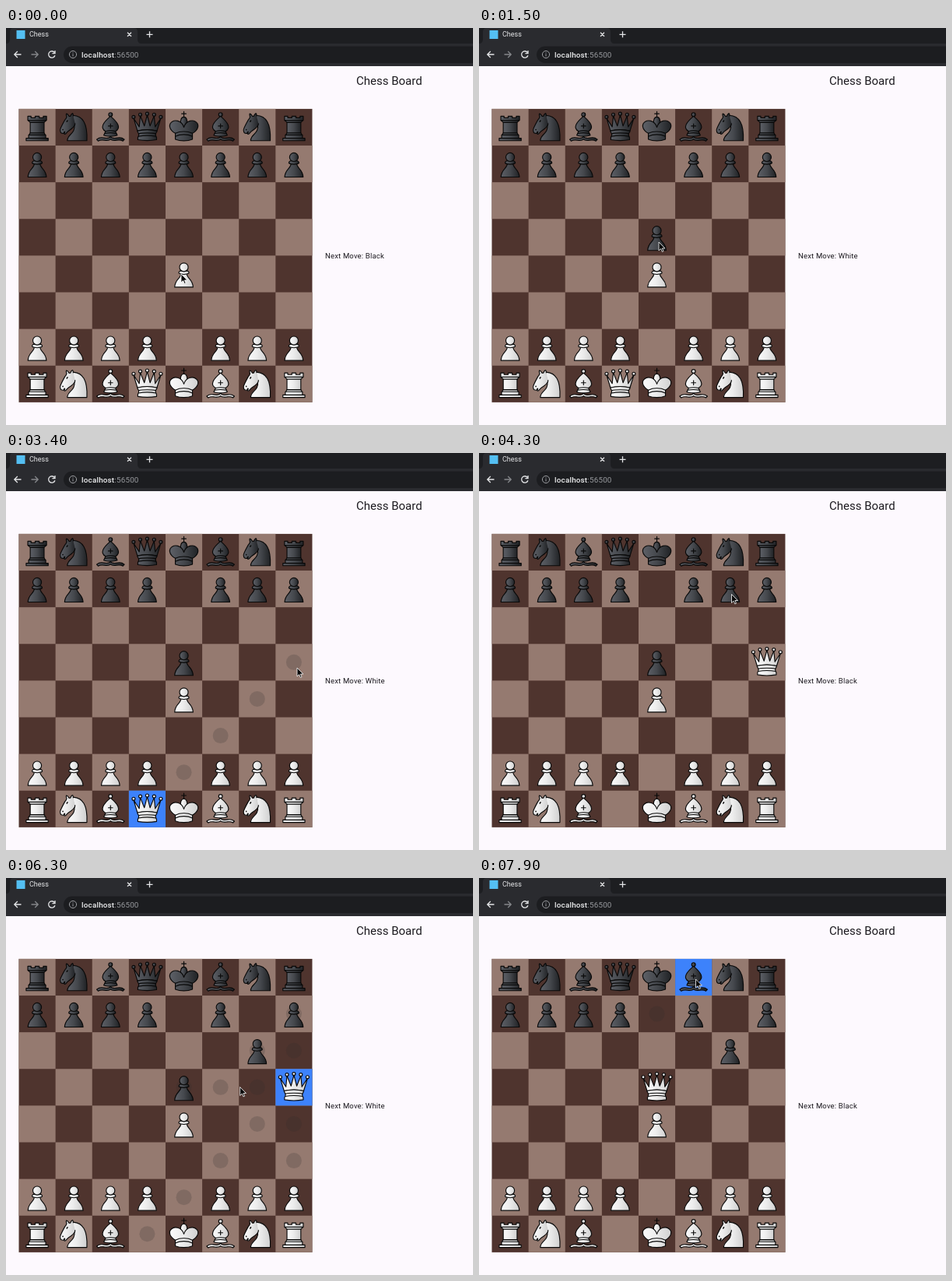
An HTML page for the animation above (8 s loop, 600 by 510 pixels).

```html
<!DOCTYPE html>
<html lang="en">
<head>
<meta charset="utf-8">
<title>Chess</title>
<style>
  html, body { margin: 0; width: 100%; height: 100%; overflow: hidden; background: #fdf9fe; }
  svg { display: block; font-family: Roboto, Arial, sans-serif; }
  .piece { stroke: #090909; stroke-width: 1.1; stroke-linejoin: round; stroke-linecap: round; }
  .white { fill: url(#ivory); }
  .black { fill: url(#ebony); }
  .line { fill: none; }
  .dot { fill: #090909; stroke: none; }
  .icon { fill: none; stroke: #e4e5e7; stroke-width: 1.3; }
</style>
</head>
<body>
<svg width="600" height="510" viewBox="0 0 600 510">
  <defs>
    <linearGradient id="ivory"><stop stop-color="#fbfbfb"/><stop offset=".45" stop-color="#ededed"/><stop offset="1" stop-color="#d0d0d0"/></linearGradient>
    <linearGradient id="ebony"><stop stop-color="#5d6067"/><stop offset=".5" stop-color="#45484d"/><stop offset="1" stop-color="#202225"/></linearGradient>

    <g id="p">
      <path d="M19 21.500C19.500 28 11.500 28.500 11.200 38.700H33.800C33.500 28.500 25.500 28 26 21.500Z"/>
      <path d="M18 18.800H27Q29 20 28.700 21.500 27 23 22.500 23 18 23 16.300 21.500 16 20 18 18.800Z"/>
      <circle cx="22.500" cy="14.300" r="5.300"/>
    </g>
    <g id="r">
      <path d="M9 39H36V36H9ZM12.500 32 14 29.500H31L32.500 32ZM12 36V32H33V36Z"/>
      <path d="M14 29.500V16.500H31V29.500Z"/>
      <path d="M14 16.500 11 14H34L31 16.500ZM11 14V9H15V11H20V9H25V11H30V9H34V14Z"/>
    </g>
    <g id="n">
      <path d="M21.500 8C33.500 8.500 39.500 18 38.500 39H14.500C14.500 30 25 32 23 18"/>
      <path d="M24 18C24.400 20.900 18.500 25.400 16 27 13 29 13.200 31.300 11 31 10 30 12.400 28 11 28 10 28 11.200 29.200 10 30 9 30 5.700 31 5.700 26 5.700 24 11.500 13.500 11.500 13.500S13.500 11.300 13.700 9.700C13 8.500 13.200 7.500 13.200 6 14.500 5.500 16.500 9 16.500 9H18.300S19 6.500 20.700 5.500C21.700 5.500 21.700 8.500 21.700 8.500"/>
      <circle class="dot" cx="9" cy="25.500" r=".8"/>
      <ellipse class="dot" cx="14.300" cy="15" rx=".8" ry="1.500" transform="rotate(30 14.300 15)"/>
    </g>
    <g id="b">
      <path d="M22.500 34C21 36.800 16.500 36 13.500 35.500 10.500 35 8 35.500 5.500 37.500L7.300 39.400C10 37.700 12 38 15 38.400 19 38.900 21.300 38.700 22.500 37.200 23.700 38.700 26 38.900 30 38.400 33 38 35 37.700 37.700 39.400L39.500 37.500C37 35.500 34.500 35 31.500 35.500 28.500 36 24 36.800 22.500 34Z"/>
      <path d="M14.200 32.300C17.500 34 27.500 34 30.800 32.300L28.500 27.500C36 23.500 31.500 16.500 22.500 9 13.500 16.500 9 23.500 16.500 27.500Z"/>
      <circle cx="22.500" cy="6.900" r="2.300"/>
      <path class="line" d="M16.500 27.500Q22.500 26 28.500 27.500M15.300 30Q22.500 28.700 29.700 30M22.500 18.300V23.700M19.800 21H25.200"/>
    </g>
    <g id="q">
      <path d="M10.500 27C17.500 25.300 27.500 25.300 34.500 27L39.200 11.500 32.300 22 31 8.500 26 21 22.500 7.500 19 21 14 8.500 12.700 22 5.800 11.500Z"/>
      <path d="M10.500 27C10.500 28.500 11.500 29 12 30.500 12.500 32 12 32.500 11.800 33.500 10.800 34.500 11 36 11 36V37.800C17.500 39 27.500 39 34 37.800V36S34.200 34.500 33.200 33.500C33 32.500 32.500 32 33 30.500 33.500 29 34.500 28.500 34.500 27 27.500 25.300 17.500 25.300 10.500 27Z"/>
      <path class="line" d="M12 30.500C16 29.300 29 29.300 33 30.500M11.800 33.700C18 32.500 27 32.500 33.200 33.700"/>
      <g id="balls"></g>
    </g>
    <g id="k">
      <path class="line" d="M22.500 11V3.300M19.800 6H25.200"/>
      <path d="M22.500 25S28 17 26 13C25.500 11 24.500 10 22.500 10S19.500 11 19 13C17 17 22.500 25 22.500 25"/>
      <path d="M12 37.300C18 39.700 27 39.700 33 37.300V30S42.500 25 39.200 18C34.500 11.500 25 14.500 22.500 22.500 20 14.500 10.500 11.500 5.800 18 2.500 25 12 30 12 30Z"/>
      <path class="line" d="M12 30C18 27 27 27 33 30M12 33.700C18 30.700 27 30.700 33 33.700"/>
    </g>
  </defs>

  <rect width="600" height="510" fill="#fdf9fe"/>

  <rect width="600" height="49" fill="#1d1e21"/>
  <path d="M0 20Q5 20 5 14V5Q5 0 10 0H164Q169 0 169 5V14Q169 20 174 20H600V49H0Z" fill="#2a2b2f"/>
  <rect x="74" y="23.500" width="540" height="21.500" rx="10.700" fill="#1c1d20"/>
  <rect x="13.500" y="3" width="11" height="11" fill="#54bff2"/>
  <text x="30" y="11.300" font-size="9" fill="#e6e7e9">Chess</text>
  <g class="icon">
    <path d="M156 5.700 161 10.700M161 5.700 156 10.700M180.500 8.300H188.500M184.500 4.300V12.300"/>
    <path d="M19.500 34H11M14.800 30 10.800 34 14.800 38"/>
    <path d="M32.500 34H41M37.200 30 41.200 34 37.200 38" stroke="#85878b"/>
    <path d="M62.300 31.500A4.200 4.200 0 1 0 62.900 35.200M63 29V32.600H59.400"/>
    <path d="M86 33.400V36.500M86 31.300V32.500" stroke="#9b9da1" stroke-width="1"/>
    <circle cx="86" cy="34" r="4.600" stroke="#9b9da1" stroke-width="1"/>
  </g>
  <text x="97" y="37.500" font-size="9.800" letter-spacing=".22" fill="#9a9ca0"><tspan fill="#f1f2f3" font-weight="500">localhost</tspan>:56500</text>

  <text x="450" y="73" font-size="15" fill="#1d1b20">Chess Board</text>
  <text id="status" x="410" y="295.800" font-size="9.520" letter-spacing=".17" fill="#1d1b20"></text>

  <g id="squares"></g>
  <rect id="selection" fill="#3d82fb"/>
  <g id="hints" fill="#2d2d2d" fill-opacity=".2"></g>
  <g id="pieces"></g>
  <path id="cursor" d="M0 0V11L2.600 8.600 4.300 12.400 6 11.700 4.400 8H7.900Z" fill="#080808" stroke="#fff" stroke-width=".8"/>
</svg>
<script>
const LOOP = 8000, CELL = 47.12, LEFT = 16.5, TOP = 103.9;
const $ = id => document.getElementById(id);

function add(parent, tag, attrs) {
  const el = document.createElementNS('http://www.w3.org/2000/svg', tag);
  for (const key in attrs) el.setAttribute(key, attrs[key]);
  return parent.appendChild(el);
}

// Algebraic square name to the pixel position of its top left corner
const corner = sq => ({
  x: LEFT + 'abcdefgh'.indexOf(sq[0]) * CELL,
  y: TOP + (8 - sq[1]) * CELL
});

const moves = [
  { at: 1200, from: 'e7', to: 'e5' },
  { at: 3500, from: 'd1', to: 'h5' },
  { at: 5100, from: 'g7', to: 'g6' },
  { at: 6700, from: 'h5', to: 'e5' }
];
const selections = [
  { at: 700, end: 1200, sq: 'e7', hints: 'e6 e5' },
  { at: 2500, end: 3500, sq: 'd1', hints: 'e2 f3 g4 h5' },
  { at: 4500, end: 5100, sq: 'g7', hints: 'g6 g5' },
  { at: 5900, end: 6700, sq: 'h5', hints: 'g6 h6 h7 g5 f5 e5 h4 h3 g4 f3 e2 d1' },
  { at: 7800, end: LOOP, sq: 'f8', hints: 'e7' }
];
// Pointer rests: arrive, leave, x, y
const stops = [
  [0, 100, 225, 316], [600, 750, 229, 178], [1150, 1600, 231, 275],
  [2350, 2600, 182, 474], [3300, 3600, 374, 276], [4200, 4600, 324.5, 181.5],
  [5000, 5200, 323, 230], [5650, 6000, 378, 270], [6600, 6950, 224, 267],
  [7700, LOOP, 278.5, 130]
];

for (const [x, y] of [[5.8, 10], [14, 7], [22.5, 6], [31, 7], [39.2, 10]])
  add($('balls'), 'circle', { cx: x, cy: y, r: 1.9 });

const pieces = [];
function addPiece(kind, color, sq) {
  const el = add($('pieces'), 'use', { href: '#' + kind, class: 'piece ' + color });
  pieces.push({ el, home: sq });
}

add($('squares'), 'rect', { x: LEFT, y: TOP, width: CELL * 8, height: CELL * 8, fill: '#4f342e' });
[...'abcdefgh'].forEach((file, i) => {
  for (let rank = 1; rank <= 8; rank++) {
    if ((i + rank) % 2) continue;
    const { x, y } = corner(file + rank);
    add($('squares'), 'rect', { x, y, width: CELL, height: CELL, fill: '#957a70' });
  }
  addPiece('rnbqkbnr'[i], 'black', file + 8);
  addPiece('p', 'black', file + 7);
  addPiece('p', 'white', file + (file === 'e' ? 4 : 2));
  addPiece('rnbqkbnr'[i], 'white', file + 1);
});
$('selection').setAttribute('width', CELL);
$('selection').setAttribute('height', CELL);

function drawPieces(done) {
  for (const piece of pieces) {
    let sq = piece.home;
    for (const move of done) {
      if (sq === move.from) sq = move.to;
      else if (sq === move.to) sq = null;
    }
    piece.el.style.display = sq ? '' : 'none';
    if (!sq) continue;
    const { x, y } = corner(sq);
    piece.el.setAttribute('transform', `translate(${x} ${y}) scale(${CELL / 45})`);
  }
}

function drawSelection(active) {
  $('selection').style.display = active ? '' : 'none';
  $('hints').replaceChildren();
  if (!active) return;
  const { x, y } = corner(active.sq);
  $('selection').setAttribute('x', x);
  $('selection').setAttribute('y', y);
  for (const sq of active.hints.split(' ')) {
    const c = corner(sq);
    add($('hints'), 'circle', { cx: c.x + CELL / 2, cy: c.y + CELL / 2, r: 10 });
  }
}

function pointerAt(t) {
  const i = stops.findLastIndex(stop => stop[0] <= t);
  const [, leave, x, y] = stops[i];
  if (t <= leave || i === stops.length - 1) return [x, y];
  const [arrive, , nx, ny] = stops[i + 1];
  const u = (t - leave) / (arrive - leave), ease = u * u * (3 - 2 * u);
  return [x + (nx - x) * ease, y + (ny - y) * ease];
}

function render(t) {
  const done = moves.filter(move => move.at <= t);
  drawPieces(done);
  drawSelection(selections.find(s => s.at <= t && t < s.end));
  $('status').textContent = 'Next Move: ' + (done.length % 2 ? 'White' : 'Black');
  $('cursor').setAttribute('transform', `translate(${pointerAt(t)})`);
}

const start = performance.now();
function tick() {
  render((performance.now() - start) % LOOP);
  requestAnimationFrame(tick);
}
tick();
</script>
</body>
</html>
```
